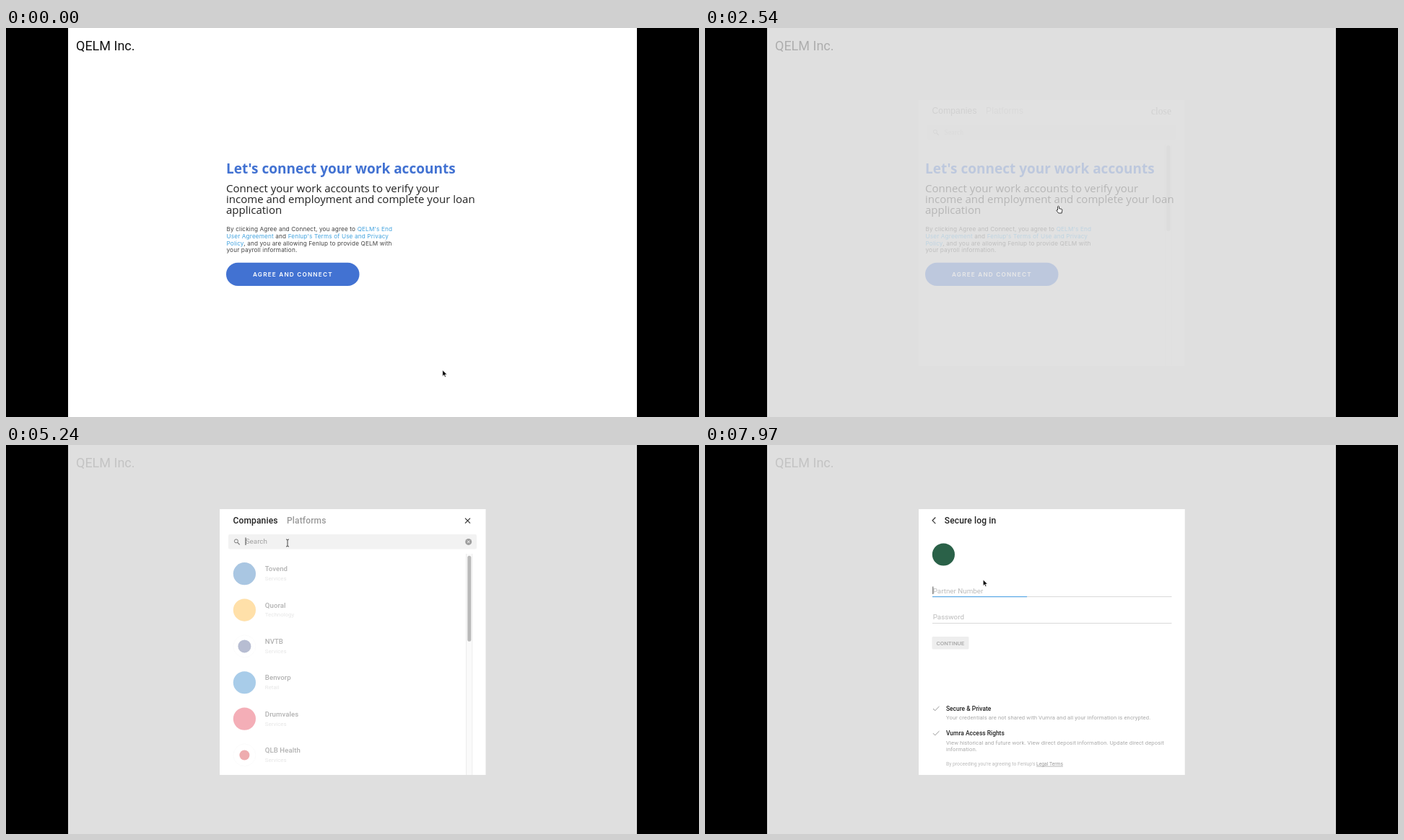
Write an HTML page that moves like this. It is 960x540 px and loops after 8 s.

```html
<!DOCTYPE html>
<html lang="en">
<head>
<meta charset="utf-8">
<title>Connect work accounts</title>
<style>
html, body { margin: 0; width: 100%; height: 100%; overflow: hidden; background: #000; }
svg { display: block; width: 100vw; height: 100vh; }
text { font-family: Roboto, sans-serif; white-space: pre; }
.brand { font-size: 18px; fill: #111; }
.head { font: 700 19px "Open Sans", sans-serif; fill: #4272d2; }
.lead { font: 400 15px "Open Sans", sans-serif; fill: #222; }
.fine { font: 400 8.2px Inter, sans-serif; letter-spacing: .15px; fill: #444; }
.link { fill: #43a3df; }
.agree { font: 600 8.2px Inter, sans-serif; letter-spacing: 1.2px; fill: #fff; }
.tab { font-size: 12px; font-weight: 500; letter-spacing: .15px; fill: #222; }
.off { fill: #999; }
.name { font-size: 9.6px; font-weight: 500; letter-spacing: .07px; fill: #222; }
.kind { font-size: 7.9px; fill: #b8b8b8; }
.field { font-size: 9.8px; fill: #333; }
.hint { fill: #a0a0a0; }
.pale { fill: #bbb; }
.btn { font-size: 8px; font-weight: 500; fill: #a8a8a8; }
.sub { font-size: 8.45px; font-weight: 500; fill: #222; }
.note { font-size: 7.7px; letter-spacing: .1px; fill: #aaa; }
.legal { font-size: 6.75px; fill: #bbb; }
.raw text { font-family: "Liberation Sans", Arial, sans-serif; font-weight: 400; }
.raw .serif { font-family: "Liberation Serif", "Times New Roman", serif; }
.line { fill: none; stroke: #333; stroke-width: 1.2; }
</style>
</head>
<body>
<svg id="stage" viewBox="0 0 960 540">
  <defs><clipPath id="box"><rect x="296" y="150" width="368.5" height="308"/></clipPath></defs>
  <rect x="86" width="788" height="540" fill="#fff"/>
  <rect id="veil" x="86" width="788" height="540" fill="#dfdfdf"/>
  <g id="page">
    <text class="brand" x="97" y="31">QELM Inc.</text>
    <text class="head" x="305" y="202.3">Let's connect your work accounts</text>
    <text class="lead" x="305" y="228">Connect your work accounts to verify your</text>
    <text class="lead" x="305" y="243">income and employment and complete your loan</text>
    <text class="lead" x="305" y="258">application</text>
    <text class="fine" x="305.5" y="282">By clicking Agree and Connect, you agree to <tspan class="link">QELM's End</tspan></text>
    <text class="fine" x="305.5" y="291.8"><tspan class="link">User Agreement</tspan> and <tspan class="link">Fenlup's Terms of Use and Privacy</tspan></text>
    <text class="fine" x="305.5" y="301.6"><tspan class="link">Policy</tspan>, and you are allowing Fenlup to provide QELM with</text>
    <text class="fine" x="305.5" y="311.4">your payroll information.</text>
    <rect x="305" y="325.7" width="184.5" height="32.3" rx="16.1" fill="#4272d2"/>
    <text class="agree" x="342" y="344.8">AGREE AND CONNECT</text>
  </g>
  <g id="modal">
    <rect x="296" y="89" width="368.5" height="369" fill="#fff"/>
    <g id="early" class="raw">
      <text class="tab" x="314.5" y="108.5">Companies</text>
      <text class="tab off" x="389" y="108.5">Platforms</text>
      <text class="serif" x="618" y="109" font-size="13.6" fill="#222">close</text>
      <rect x="308" y="123" width="344" height="21" rx="2" fill="#f2f2f2"/>
      <text class="field hint serif" x="331.5" y="136.7">Search</text>
    </g>
    <g id="ready">
      <text class="tab" x="314.5" y="109.3">Companies</text>
      <text class="tab off" x="389" y="109.3">Platforms</text>
      <path class="line" d="M636 101.7l7 7m0-7l-7 7"/>
      <rect x="308" y="124" width="344" height="20.5" rx="2" fill="#f2f2f2"/>
      <text id="query" class="field" x="331.8" y="137.2"></text>
      <path id="caret" d="M0 128.5v10.5" stroke="#333" stroke-width=".9"/>
      <circle cx="640.7" cy="134.4" r="4.5" fill="#9e9e9e"/>
      <path d="M639 132.7l3.4 3.4m0-3.4l-3.4 3.4" stroke="#fff" stroke-width=".9"/>
    </g>
    <g id="finder">
      <circle cx="318.9" cy="132.4" r="2.5" class="line" style="stroke:#777;stroke-width:1"/>
      <path d="M320.7 134.3l3 3" stroke="#777" stroke-width="1.2"/>
      <rect x="637" y="150" width="9" height="307" fill="#fafafa"/>
      <path d="M637.5 150v307M645.8 150v307" stroke="#e9e9e9" stroke-width=".8"/>
      <rect id="thumb" x="639.3" y="152" width="5" height="119" rx="2.5" fill="#bababa"/>
    </g>
    <g clip-path="url(#box)">
      <g id="popular"></g>
      <g id="first"></g>
      <g id="found"></g>
    </g>
    <g id="login">
      <rect x="296" y="89" width="368.5" height="369" fill="#fff"/>
      <g id="form">
        <path class="line" d="M319.3 100.5l-4.2 4.3 4.2 4.3"/>
        <text class="tab" x="331.8" y="109.3">Secure log in</text>
        <circle cx="330.4" cy="152" r="15.6" fill="#2a6148"/>
        <text class="field pale" x="315.7" y="205.5">Partner Number</text>
        <text class="field pale" x="315.7" y="242.4">Password</text>
        <path d="M315 210.6h331.5M315 247.4h331.5" stroke="#d8d8d8"/>
        <rect x="314.5" y="266" width="51" height="17.5" rx="1.5" fill="#eee"/>
        <text class="btn" x="320.5" y="277.6">CONTINUE</text>
        <path class="line" style="stroke:#888;stroke-width:.9" d="M316 366l2.7 2.7 5.8-5.8M316 400.2l2.7 2.7 5.8-5.8"/>
        <text class="sub" x="334" y="368.8">Secure &amp; Private</text>
        <text class="note" x="334" y="381.4">Your credentials are not shared with Vumra and all your information is encrypted.</text>
        <text class="sub" x="334" y="403">Vumra Access Rights</text>
        <text class="note" x="334" y="415.8">View historical and future work. View direct deposit information. Update direct deposit</text>
        <text class="note" x="334" y="425">information.</text>
        <text class="legal" x="334" y="444.8">By proceeding you're agreeing to Fenlup's <tspan text-decoration="underline" fill="#999">Legal Terms</tspan></text>
      </g>
      <path id="mark" d="M315.8 196.5v10.5" stroke="#444" stroke-width=".9"/>
      <rect id="under" x="315" y="210" height="1.2" fill="#5aa9e6"/>
    </g>
  </g>
  <g id="cursor">
    <path id="arrow" d="M0 0V8.4L1.9 6.6 3.2 9.6 4.6 9 3.3 6.1H6Z" stroke="#fff" stroke-width=".6"/>
    <path id="hand" d="M-1 .9Q0-.6 1 .9V3.7L4.5 4.3Q5.6 4.7 5.3 6.2L4.6 10H.3L-2.6 6.5Q-2.6 5-1 6Z" fill="#fff" stroke="#222" stroke-width=".9"/>
    <path id="beam" d="M-2-4.5Q0-4.5 0-3.3Q0-4.5 2-4.5M0-3.3V4.3M-2 5.5Q0 5.5 0 4.3Q0 5.5 2 5.5" fill="none" stroke="#333" stroke-width=".9"/>
  </g>
</svg>
<script>
const $ = id => document.getElementById(id);
const LOOP = 8000;

// name, kind, mark colour, mark radius
const popular = [
  ['Tovend', 'Services', '#0b5cab', 15.6],
  ['Quoral', 'Technology', '#ffa50a', 15.6],
  ['NVTB', 'Services', '#33457f', 9],
  ['Benvorp', 'Retail', '#0a70c2', 15.6],
  ['Drumvales', 'Services', '#e01935', 15.6],
  ['QLB Health', 'Services', '#d0141c', 7]
];
const found = [
  ['Starmoven', 'Retail', '#2a6148', 15.6],
  ['OMBRUL Pimstar Inc.', 'Services', '#0f4f9c', 11.5],
  ['GlebStar USA', 'Services', '#e8141c', 15.6],
  ['Quiltstar Corporation', 'Services', '#dc1f26', 11.5],
  ['Quiltstar Device Protection', 'Services', '#8d7480', 5],
  ['MittenStar Energy Services, LLC', 'Services', '#f5a21f', 10]
];

const row = ([name, kind, color, r], i) => {
  const y = 178.7 + i * 50.35;
  return `<circle cx="330.4" cy="${y}" r="15.5" fill="#fff" stroke="#f1f1f1" stroke-width=".8"/>
    <circle cx="330.4" cy="${y}" r="${r}" fill="${color}"/>
    <text class="name" x="358.8" y="${y - 3.4}">${name}</text>
    <text class="kind" x="358.8" y="${y + 9.4}">${kind}</text>`;
};
$('popular').innerHTML = popular.map(row).join('');
$('first').innerHTML = row(found[0], 0);
$('found').innerHTML = found.slice(1).map((f, i) => row(f, i + 1)).join('');

const smooth = k => k * k * (3 - 2 * k);
// Eased value from a table of [time, value] steps
function at(steps, t) {
  let i = steps.findIndex(s => s[0] > t);
  if (i < 0) return steps[steps.length - 1][1];
  if (!i) return steps[0][1];
  const [t0, a] = steps[i - 1], [t1, b] = steps[i];
  return a + (b - a) * smooth((t - t0) / (t1 - t0));
}
// Last value whose time has come
const held = (steps, t) => steps.filter(s => s[0] <= t).pop()[1];

const path = [
  [0, 604.8, 475], [60, 604.8, 475], [1150, 394.5, 338.5], [1720, 394.5, 338.5],
  [2450, 489.5, 247], [2600, 489.5, 247], [3400, 420, 190], [4050, 390, 135.5],
  [6650, 390, 135.5], [6860, 391, 166.8], [7830, 391, 166.8], [7960, 385.3, 187]
];
const pathX = path.map(p => [p[0], p[1]]);
const pathY = path.map(p => [p[0], p[2]]);
const kinds = [[0, 'arrow'], [960, 'hand'], [3860, 'beam'], [6690, 'hand'], [7870, 'arrow']];
const typed = [[0, ''], [5340, 's'], [5520, 'st'], [5700, 'sta'], [5970, 'star']];
const veil = [[1560, 0], [1670, 1]];
const pageFade = [[1560, 1], [1670, .24], [2560, .24], [3000, .13]];
const modalIn = [[2490, 0], [2540, .07], [2800, 1]];
const modalY = [[2490, 12], [2540, 11], [2700, 0]];
const popularFade = [[2580, 0], [2850, 1], [5130, 1], [5240, .35], [5400, 0]];
const foundFade = [[5620, 0], [5880, 1], [7100, 1], [7300, 0]];
const firstFade = [[5960, 0], [6140, 1], [7100, 1], [7300, 0]];
const formFade = [[7420, 0], [7640, 1]];
const underline = [[7800, 0], [7970, 131], [8000, 150]];

const fade = (id, v) => $(id).setAttribute('opacity', v);
const show = (id, on) => { $(id).style.display = on ? '' : 'none'; };
const move = (id, x, y) => $(id).setAttribute('transform', `translate(${x} ${y})`);

function draw(t) {
  fade('veil', at(veil, t));
  fade('page', at(pageFade, t));
  fade('modal', at(modalIn, t));
  show('modal', t >= 2490);
  move('modal', 0, at(modalY, t));

  const ready = t >= 4800;
  show('early', !ready);
  show('ready', ready);
  $('popular').setAttribute('class', ready ? '' : 'raw');
  move('popular', 0, ready ? 0 : 9.8);
  move('thumb', 0, ready ? .8 : -.4);
  move('finder', 0, ready ? 1 : .5);
  fade('popular', at(popularFade, t));
  fade('found', at(foundFade, t));
  fade('first', at(firstFade, t));

  const word = held(typed, t), query = $('query');
  query.textContent = word || 'Search';
  query.setAttribute('class', word ? 'field' : 'field hint');
  show('caret', t >= 4900 && t < 6100);
  move('caret', 332 + (word && ready ? query.getComputedTextLength() : 0), 0);

  show('login', t >= 7300);
  fade('login', at([[7300, 0], [7420, 1]], t));
  fade('form', at(formFade, t));
  show('mark', t >= 7840);
  $('under').setAttribute('width', at(underline, t));

  const kind = held(kinds, t);
  for (const k of ['arrow', 'hand', 'beam']) show(k, k === kind);
  move('cursor', at(pathX, t), at(pathY, t));
}

function tick() {
  draw(performance.now() % LOOP);
  requestAnimationFrame(tick);
}
tick();
</script>
</body>
</html>
```
